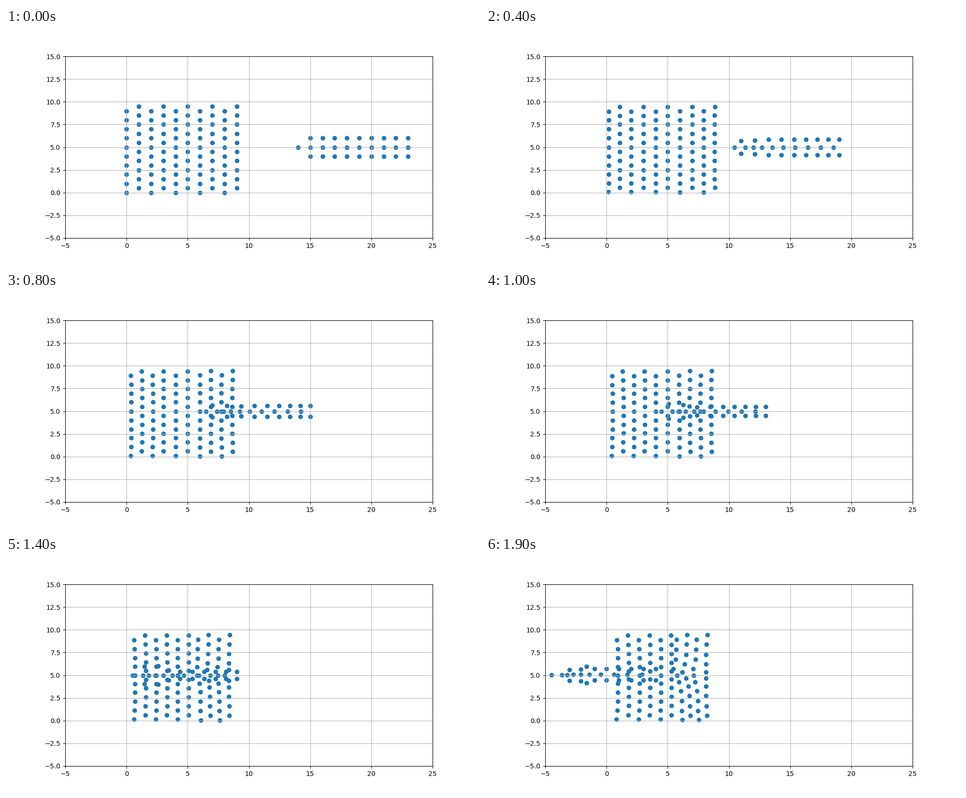
These frames come from a looping animation (1000x500 px, 2 s). A matplotlib script:

```python
import numpy as np
import matplotlib.pyplot as plt
from matplotlib.animation import FuncAnimation

STEPS = 20
AXIS = 5.0    # height of the line of flight
DELAY = 2.55  # steps a contraction wave needs to reach the next column


def grow(t, delay):
    """Zero at the start, then one unit per step once the delay has passed."""
    def ramp(s):
        return np.log1p(np.exp(2 * s)) / 2
    return ramp(t - delay) - ramp(-delay)


def smoothstep(u):
    u = np.clip(u, 0, 1)
    return u * u * (3 - 2 * u)


def front(k):
    """Weight of the leading particles, which feel the impact most."""
    return 1 / (1 + np.exp(3 * (k - 1.8)))


# Staggered lattice
col, row = (a.ravel() for a in np.indices((10, 10)))
block_x = col.astype(float)
block_y = row + 0.5 * (col % 2)
height = block_y - AXIS
depth = (block_y - 4.75) / 4.75
edge_row = np.minimum(row, 9 - row)
right = col > 5

# Projectile: a centre line and two mirrored wings
core = np.arange(10)
wing = np.arange(9)


def block(t):
    # contraction waves run inward from both sides; the corners lag
    waves = np.where(right,
                     -0.047 * grow(t, DELAY * (9 - col)),
                     0.05 * grow(t, DELAY * col))
    x = block_x + waves * (1 - 0.12 * depth ** 4)

    # the impact holds back the right half and drags its middle along
    slip = np.where(height <= 0, 0.022, 0.007) * (9 - col)
    drag = 0.05 * (col < 9) * np.exp(-(height / 1.4) ** 2)
    x += right * (slip * grow(t, 9) - drag * grow(t, 12))

    # rows close up from the top and bottom edges
    squeeze = 0.13 * (1 - np.exp(-grow(t, 3 * edge_row) / 5))
    y = block_y - squeeze * np.tanh(height) * np.where(right, 0.5, 1)

    # the passing wings part the rows, the wake then pulls them in
    part = np.exp(-((t - 13.5) / 3) ** 2) * np.exp(-(2 * height) ** 2)
    wake = 0.033 * grow(t, 10) * np.exp(-(height / 2) ** 2)
    y += right * height * (part - wake)
    return x, y


def centre_line(t):
    lead = smoothstep(core / 6) - 0.25 * (np.maximum(core - 5, 0) / 4) ** 2
    lead = 1.7 * lead * (1 - np.exp(-t / 9))
    brake = 0.5 * front(core) * (1 - np.exp(-t / 2))
    return 14 + core - t - lead + brake


def wings(t):
    """Wing positions and their distance from the line of flight."""
    lag = 0.5 * np.sin(np.pi * wing / 8) * np.sin(np.pi * t / 19)
    brake = 0.105 * front(wing) * grow(t, 9.5)
    mid = 0.69 + 0.1 * front(wing)
    period = 27 - 14 * front(wing)
    gap = mid + (1 - mid) * np.cos(2 * np.pi * t / period)
    return 15 + wing - t + lag + brake, gap


def drift(t, k):
    return AXIS + 0.08 * (1 - front(k)) * np.clip((t - 14) / 5, 0, 1)


def points(t):
    bx, by = block(t)
    wx, gap = wings(t)
    mid = drift(t, wing)
    x = np.concatenate([bx, centre_line(t), wx, wx])
    y = np.concatenate([by, drift(t, core), mid + gap, mid - gap])
    return np.column_stack([x, y])


fig, ax = plt.subplots(figsize=(10, 5), dpi=100)
ax.set_xlim(-5, 25)
ax.set_ylim(-5, 15)
ax.grid(True)
dots = ax.scatter(*points(0).T)


def update(t):
    dots.set_offsets(points(t))
    return (dots,)


anim = FuncAnimation(fig, update, frames=STEPS, interval=100, repeat=True)
plt.show()
```
